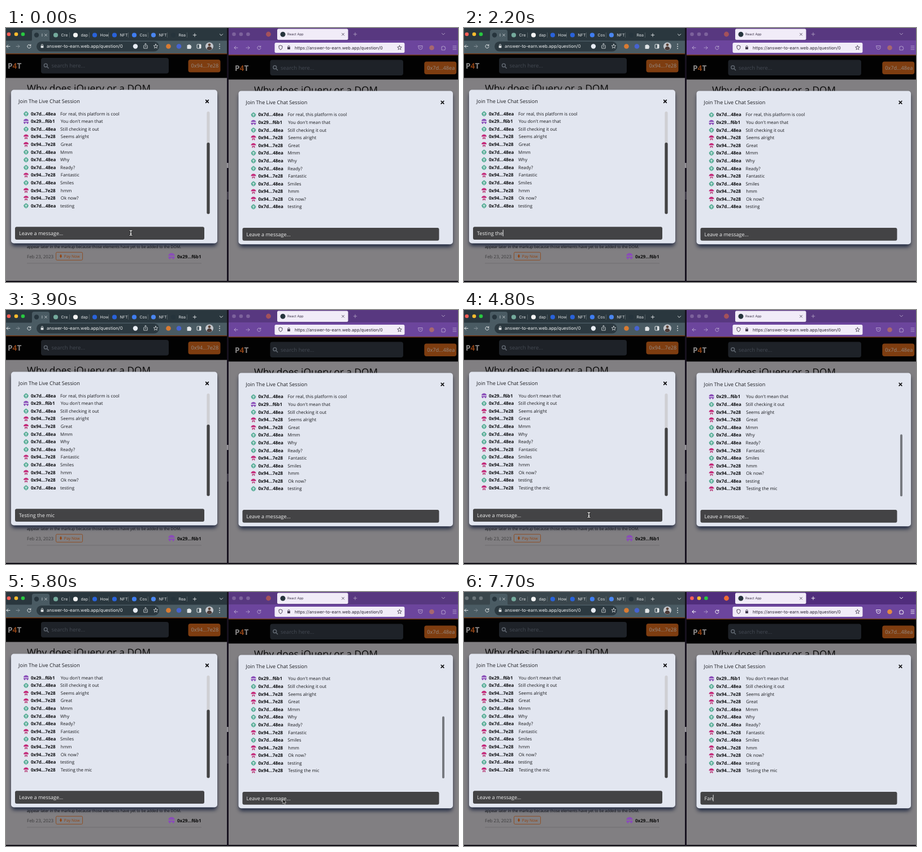
An HTML page that plays this animation: 800 by 450 pixels, repeating every 8 s.

```html
<!DOCTYPE html>
<html lang="en">
<head>
<meta charset="utf-8">
<title>Live chat in two windows</title>
<style>
  html, body { margin: 0; width: 100%; height: 100%; overflow: hidden; background: #0d0b13; }
  svg { display: block; width: 100vw; height: 100vh; }
  text { font-family: "Open Sans", sans-serif; text-rendering: geometricPrecision; white-space: pre; }
  .ui { font-family: Inter, sans-serif; }
  .shadow { filter: blur(3.8px); }
</style>
</head>
<body>
<svg id="stage" viewBox="0 0 800 450"></svg>
<script>
const LOOP = 8000;
const SEND = 4300, RECEIVE = 4400, SWITCH = 5900, CLICK = 6400;
const BRAND = ['P', '4', 'T'];
const USERS = {
  teal: '0x7d...48ea',
  purple: '0x29...f6b1',
  pink: '0x94...7e28'
};
const MESSAGES = [
  ['teal', 'For real, this platform is cool'], ['purple', "You don't mean that"],
  ['teal', 'Still checking it out'], ['pink', 'Seems alright'], ['pink', 'Great'],
  ['teal', 'Mmm'], ['teal', 'Why'], ['teal', 'Ready?'], ['pink', 'Fantastic'],
  ['teal', 'Smiles'], ['pink', 'hmm'], ['pink', 'Ok now?'], ['teal', 'testing'],
  ['pink', 'Testing the mic']
];
const HINT = 'Leave a message...';
// Time of each keystroke
const LEFT_KEYS = [450, 600, 800, 950, 1150, 1300, 1450, 1600, 1900, 2050, 2200, 2400, 2650, 2850, 3000];
const RIGHT_KEYS = [7000, 7500, 7600];
const MOUSE = [[4800, 221, 363], [5300, 471, 371], [5600, 490, 367], [6300, 490, 367], [6500, 501, 365]];

const stage = document.getElementById('stage');
const ruler = document.createElement('canvas').getContext('2d');
ruler.font = '90px "Open Sans", sans-serif';
const inputWidth = s => ruler.measureText(s).width / 10;

const rect = (x, y, w, h, fill, r = 0, extra = '') =>
  `<rect x="${x}" y="${y}" width="${w}" height="${h}" rx="${r}" fill="${fill}" ${extra}/>`;
const dot = (x, y, r, fill) => `<circle cx="${x}" cy="${y}" r="${r}" fill="${fill}"/>`;
const text = (x, y, size, fill, s, extra = '') =>
  `<text x="${x}" y="${y}" font-size="${size}" fill="${fill}" ${extra}>${s}</text>`;
const ui = (x, y, size, fill, s) => text(x, y, size, fill, s, 'class="ui"');
const shape = (d, fill, extra = '') => `<path d="${d}" fill="${fill}" ${extra}/>`;
const line = (d, color, w = 1) =>
  `<path d="${d}" fill="none" stroke="${color}" stroke-width="${w}" stroke-linecap="round" stroke-linejoin="round"/>`;
const at = (x, y, body, scale = 1) => `<g transform="translate(${x} ${y}) scale(${scale})">${body}</g>`;
const BOLD = 'font-weight="700"';

const ICONS = {
  teal: shape('M0-4.9Q2.2-3.6 4.6-.9Q4.6 3 0 4.7Q-4.6 3-4.6-.9Q-2.2-3.6 0-4.9Z', '#5aae98') +
        line('M0-2V2.6M-1.5-.6H1.5', '#dcecec', 1.1),
  pink: shape('M-4.8-.3C-4.2-5.8 4.2-5.8 4.8-.3Z', '#c42a7a') +
        shape('M-2.6 1H2.6V4.4H1V2.8H-1V4.4H-2.6Z', '#b8437c'),
  purple: shape('M-4.8-.8C-4.2-6 4.2-6 4.8-.8Z', '#8a4db8') +
          shape('M-4.8.6H4.8Q4.4 4.4 1.8 4.6L1.2 2.4H-1.2L-1.8 4.6Q-4.4 4.4-4.8.6Z', '#8a4db8')
};

const plus = (x, y, c) => line(`M${x - 2.8} ${y}h5.6M${x} ${y - 2.8}v5.6`, c, .9);
const cross = (x, y, r, c, w) => line(`M${x - r} ${y - r}l${2 * r} ${2 * r}m0 ${-2 * r}l${-2 * r} ${2 * r}`, c, w);
const chevron = (x, y, c) => line(`M${x - 2.6} ${y - 1.2}l2.6 2.6l2.6-2.6`, c);
const arrow = (x, y, dir, c) => line(`M${x - 3 * dir} ${y}h${6 * dir}m${-2.7 * dir}-2.7l${2.7 * dir} 2.7l${-2.7 * dir} 2.7`, c);
const reload = (x, y, c) => line(`M${x + 2.6} ${y - 1.6}a3.1 3.1 0 1 0 .4 2.4M${x + 2.8} ${y - 3.2}v2h-2`, c);
const star = (x, y, c) => {
  const points = Array.from({ length: 10 }, (_, i) => {
    const r = i % 2 ? 1.8 : 4, a = i * Math.PI / 5;
    return `${(x + r * Math.sin(a)).toFixed(2)} ${(y - r * Math.cos(a)).toFixed(2)}`;
  });
  return line(`M${points.join('L')}Z`, c, .8);
};
const lock = (x, y, c) => line(`M${x - 1.5} ${y}v-1.6a1.5 1.5 0 0 1 3 0v1.6`, c, .9) + rect(x - 2.4, y - .6, 4.8, 3.8, c, .6);
const puzzle = (x, y, c, fill = 'none') =>
  shape(`M${x - 3} ${y - 2}h2a1 1 0 1 1 2 0h2v2a1 1 0 1 1 0 2v2h-6z`, fill, `stroke="${c}" stroke-width=".9"`);
const lights = (xs, colors) => xs.map((x, i) => dot(x, 11, 3.3, colors[i % colors.length])).join('');
const TRAFFIC = ['#fe5f57', '#febc2e', '#28c840'];

function leftBrowser(active) {
  const pale = '#e1e5e7', toolbar = '#4a5b63';
  const tabs = [
    [88, '#74aa9c', 'Cre'], [123, '#f4f4f4', 'dap'], [157, '#2962d9', 'How'], [192, '#2962d9', 'NFT'],
    [227, '#3f7df0', 'Cos'], [261, '#4a86f0', 'NFT'], [296, '#26343c', 'Rea']
  ];
  return rect(0, 0, 391, 24, active ? '#2a373e' : '#3a464c') +
    lights([5, 18, 30], active ? TRAFFIC : ['#6c767b']) +
    shape('M43 24Q46 23 46 20V7Q46 3 50 3H73Q77 3 77 7V20Q77 23 80 24Z', toolbar) +
    dot(54, 12.5, 4.2, '#26343c') + ui(63, 15, 7, pale, 'I') + cross(70.5, 12.5, 1.8, pale, .8) +
    tabs.map(([x, color, title]) => dot(x, 12.5, 4.1, color) + ui(x + 9.5, 15, 7, pale, title) +
      rect(x + 24, 8, .6, 9, '#69757b')).join('') +
    plus(334, 12.5, pale) + chevron(381, 12, pale) +
    rect(0, 22.5, 391, 22.5, toolbar) +
    arrow(4, 32.5, -1, pale) + arrow(21, 32.5, 1, '#87939a') + reload(41, 32.5, pale) +
    rect(54, 24, 217, 17.5, '#2c3940', 8.7) + lock(64, 32, pale) +
    ui(72, 35.3, 7.85, '#f0f2f3', 'answer-to-earn.web.app/question/0') +
    dot(229, 32.5, 4.2, '#e8edf5') +
    line('M245 31h-1.2v5h6.4v-5H249M247 33.5v-6m-1.7 1.7l1.7-1.7l1.7 1.7', pale, .8) + star(265, 32.5, pale) +
    dot(287.5, 32.5, 4.3, '#d97b32') + dot(306, 32.5, 4.3, '#4663d1') + puzzle(324, 32.5, pale, pale) +
    rect(338, 29, 7, 7, 'none', 1, `stroke="${pale}"`) + rect(342, 29, 3, 7, pale) +
    dot(360, 32.5, 7, '#c3c6cb') + dot(360, 29.8, 2.4, '#5d4438') + shape('M355.3 37.6Q356 32.7 360 32.7T364.7 37.6Q360 41 355.3 37.6Z', '#4b3b38') +
    [28.7, 32.5, 36.3].map(y => dot(378, y, .9, pale)).join('');
}

function rightBrowser(active) {
  const ink = '#ffffff', dark = '#3b3348', field = '#f1ecf8';
  const dim = body => `<g opacity="${active ? 1 : .5}">${body}</g>`;
  return rect(394, 0, 406, 23, active ? '#502d7c' : '#583880') + rect(394, 22, 406, 25.3, '#6c459d') +
    lights([403.5, 416, 428.5], active ? TRAFFIC : ['#7d629c']) +
    dim(dot(464.5, 11, 4.4, '#f06b35') + plus(618, 11, ink) + chevron(774, 10.5, ink) +
      arrow(407, 35, -1, ink) + reload(448, 35, ink) +
      line('M730 31.5h7v3a3.5 3.5 0 0 1-7 0zM732 33.5l1.5 1.5l1.5-1.5', ink, .9) + dot(753.5, 35, 4.3, '#e28a43') +
      puzzle(774, 35, ink) + line('M791 32h6m-6 3h6m-6 3h6', ink, .9)) +
    `<g opacity=".4">${arrow(428, 35, 1, ink)}</g>` +
    rect(480, 1.5, 125.5, 19.5, field, 2.5) + dot(490, 11.2, 4.5, '#26343c') +
    ui(498, 13.4, 5.9, dark, 'React App') + cross(596.5, 11.2, 2, dark, .8) +
    rect(475.5, 26, 230, 18, field, 2.5) +
    line('M486 31l3 1v2.2q0 3-3 4.3q-3-1.3-3-4.3V32z', dark, .9) + lock(500.5, 34.6, dark) +
    ui(511, 37.8, 7.58, '#2a2433', 'https://answer-to-earn.web.app/question/0') + star(696.5, 35, dark);
}

// Dimmed page behind the dialog; centerY is the middle of its header
function page({ x, top, centerY, headerEnd, indent, searchX, searchW, buttonX, user }) {
  const width = x ? 406 : 391;
  return rect(x, 45, width, 403, '#817f82') +
    rect(x, 45, width, headerEnd - 45, '#020202') + rect(x, top, width, 1.6, '#7a3a12') +
    text(x + indent, centerY + 5, 13.7, '#8c8a8a',
      `${BRAND[0]}<tspan fill="#8a4015">${BRAND[1]}</tspan>${BRAND[2]}`, BOLD) +
    rect(searchX, centerY - 14, searchW, 27.5, '#1e2228', 4) +
    `<circle cx="${searchX + 8.3}" cy="${centerY - .8}" r="2.9" fill="none" stroke="#5f666f" stroke-width="1.5"/>` +
    line(`M${searchX + 10.5} ${centerY + 1.5}l2.6 2.6`, '#5f666f', 1.5) +
    text(searchX + 18.5, centerY + 3.4, 9.5, '#434952', 'search here...') +
    rect(buttonX, centerY - 11, 57, 22.5, '#7e3d10', 4) +
    text(buttonX + 5, centerY + 3.3, 9.2, '#948a84', user) +
    text(x + indent + 34, centerY + 45.7, 17.25, '#080808', 'Why does jQuery or a DOM');
}

function questionFooter() {
  return text(37, 390, 6.82, '#080808', 'appear later in the markup because those elements have yet to be added to the DOM.') +
    text(37, 407.6, 8, '#3c3b3d', 'Feb 23, 2023') +
    rect(88.5, 397.3, 47, 14, 'none', 2, 'stroke="#8f4a1c" stroke-width=".9"') +
    shape('M97 400.5l2 3.7l-2 3.6l-2-3.6z', '#93430f') + text(102.8, 407, 6.9, '#93430f', 'Pay Now') +
    at(293, 404.4, ICONS.purple, 1.2) + text(303, 407.6, 8, '#080808', USERS.purple, BOLD) +
    rect(37, 416.5, 309, .8, '#6d6b6e');
}

function dialog(x, y, width, closeX, inputW, received, input, caret, scrollbar) {
  const first = received ? 1 : 0;
  const rows = MESSAGES.slice(first, first + 13).map(([who, message], i) => {
    const rowY = 152 + i * 13.58;
    return at(35.5, rowY, ICONS[who], .95) + text(44, rowY + 2.7, 8, '#0c0d10', USERS[who], BOLD) +
      text(who === 'teal' ? 96 : 96.8, rowY + 2.7, 7.92, '#17181c', message);
  }).join('');
  const caretX = 23 + (input === HINT ? 0 : inputWidth(input));
  return at(x, y,
    rect(10, 115, width - 2, 271, '#141e38', 5, 'class="shadow" opacity=".9"') +
    rect(9, 109.6, width, 271.8, '#e2e6f0', 5) +
    text(22, 133.3, 9.06, '#1b1c20', 'Join The Live Chat Session') +
    cross(closeX, 130, 2.3, '#0b0b0d', 1.7) + rows + scrollbar +
    rect(16, 352.3, inputW, 22.7, '#434345', 3) + text(23, 367, 9, '#f0f0f0', input) +
    (caret ? rect(caretX, 357.5, .9, 11.5, '#ffffff') : ''));
}

const typed = (message, keys, t) => message.slice(0, keys.filter(k => k <= t).length) || HINT;
const blink = elapsed => elapsed >= 0 && elapsed % 1000 < 500;

function leftCaret(t) {
  if (t >= SWITCH - 100) return false;
  if (t >= SEND) return blink(t - SEND);
  const last = LEFT_KEYS.filter(k => k <= t).pop();
  return last === undefined ? t > 100 && blink(t - 100) : blink(t - last);
}

function mousePosition(t) {
  const next = MOUSE.findIndex(m => m[0] > t);
  if (next === 0) return MOUSE[0].slice(1);
  if (next < 0) return MOUSE[MOUSE.length - 1].slice(1);
  const [t0, x0, y0] = MOUSE[next - 1], [t1, x1, y1] = MOUSE[next];
  const p = (t - t0) / (t1 - t0), e = p * p * (3 - 2 * p);
  return [x0 + (x1 - x0) * e, y0 + (y1 - y0) * e];
}

function mouse(t) {
  if ((t >= LEFT_KEYS[0] && t < MOUSE[0][0]) || t >= RIGHT_KEYS[0]) return '';
  const [x, y] = mousePosition(t);
  if (t < 4880 || t >= SWITCH) {
    const beam = 'M-2-4.4Q0-4.4 0-3.2Q0-4.4 2-4.4M0-3.2V3.2M-2 4.4Q0 4.4 0 3.2Q0 4.4 2 4.4M-1 1.6H1';
    return at(x, y, line(beam, '#1c1c1c', 2.6) + line(beam, '#ffffff', 1.2));
  }
  return at(x, y, shape('M0 0V8L1.9 6.3L3.2 9.1L4.6 8.4L3.4 5.7H5.8Z', '#0a0a0a', 'stroke="#e8e8e8" stroke-width=".7"'));
}

const LEFT_PAGE = {
  x: 0, top: 44.8, centerY: 67, headerEnd: 88.5, indent: 3,
  searchX: 62, searchW: 226, buttonX: 322.5, user: USERS.pink
};
const RIGHT_PAGE = {
  x: 394, top: 47, centerY: 70.5, headerEnd: 91.3, indent: 11,
  searchX: 467.5, searchW: 235.5, buttonX: 740.3, user: USERS.teal
};

function scene(t) {
  const sent = t >= SEND, received = t >= RECEIVE, rightActive = t >= SWITCH;
  const thumbY = sent ? 208.5 : 203;
  const leftBar = rect(355.4, 148, 5.2, 181.5, '#cfcfd3', 2.5) +
    rect(355.4, thumbY, 5.2, 329.5 - thumbY, '#434345', 2.5);
  const rightBar = received && t < SWITCH ? rect(369.5, 218.5, 4, 110, '#76797f', 2) : '';
  return rect(0, 0, 800, 450, '#0d0b13') +
    page(LEFT_PAGE) + questionFooter() + page(RIGHT_PAGE) +
    leftBrowser(!rightActive) + rightBrowser(rightActive) +
    dialog(0, 0, 365, 356, 335, sent, sent ? HINT : typed('Testing the mic', LEFT_KEYS, t), leftCaret(t), leftBar) +
    dialog(402.5, 1.8, 379.5, 370, 348, received, typed('Fan', RIGHT_KEYS, t), t >= CLICK, rightBar) +
    rect(391, 0, 3, 450, '#17121f') + rect(391, 239, 2.6, 9, '#98969c') + rect(391, 290, 3, 14, '#3f3a47') +
    mouse(t);
}

let shown = '';
function tick(now) {
  const picture = scene(now % LOOP);
  if (picture !== shown) stage.innerHTML = shown = picture;
  requestAnimationFrame(tick);
}
requestAnimationFrame(tick);
</script>
</body>
</html>
```
